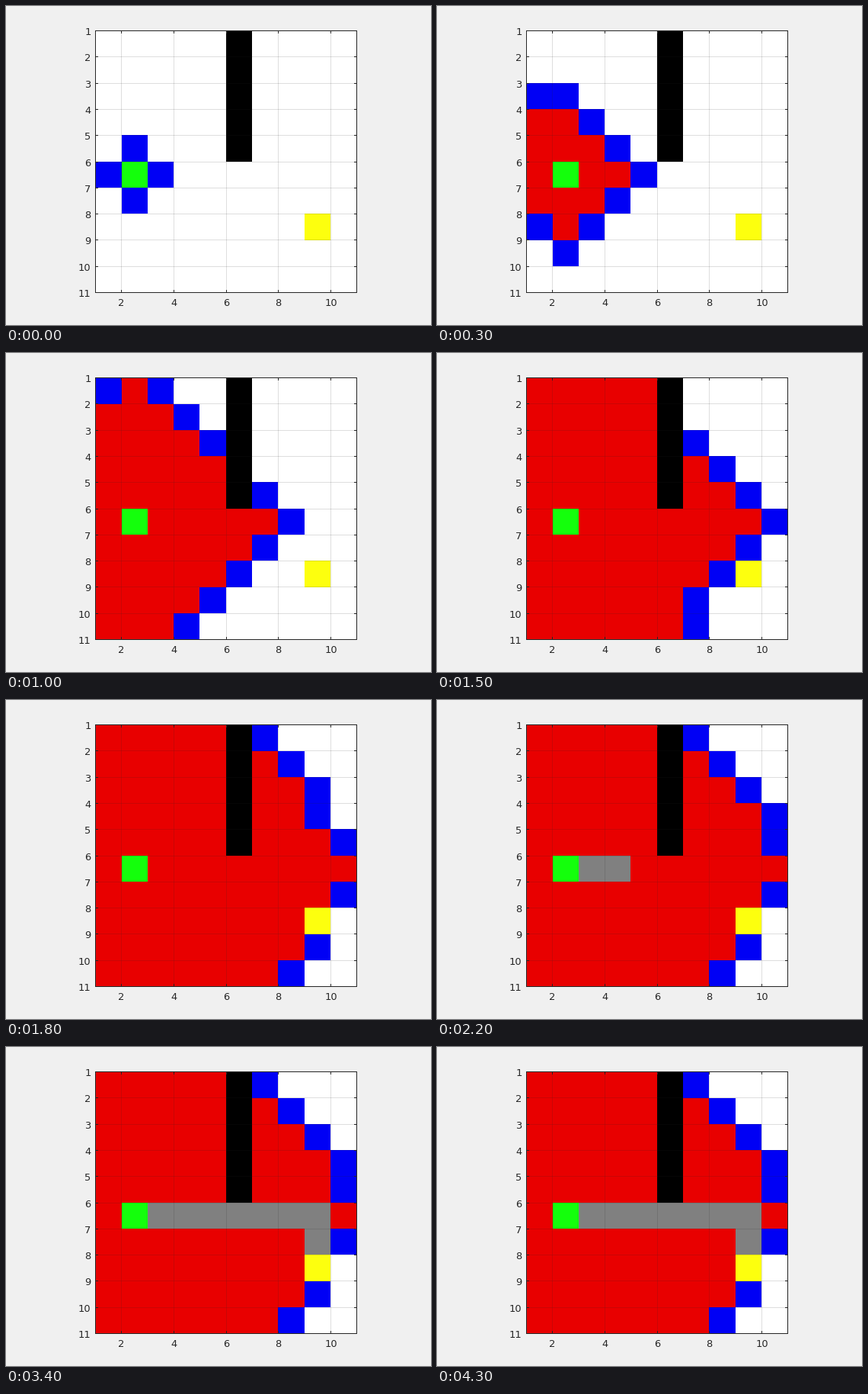
A matplotlib script for the animation above (4.4 s loop, 558 by 418 pixels).

```python
import numpy as np
import matplotlib.pyplot as plt
from matplotlib.animation import FuncAnimation
from matplotlib.colors import to_rgb

W, H, DPI = 558, 418, 64
LEFT, TOP, SIZE = 117, 32, 343     # plot box in whole pixels
RIGHT, BOTTOM = LEFT + SIZE, TOP + SIZE
N = 10
CELL = SIZE / N
TICK = 4
FRAMES, STEP = 44, 100

FREE, WALL, DONE, EDGE, START, GOAL, PATH = range(7)
COLORS = np.array([to_rgb(c) for c in (
    '#ffffff', '#000000', '#e80000', '#0000f5',
    '#14ff0c', '#fdff0e', '#808080')])
INK = np.array(to_rgb('#262626'))
BACK = to_rgb('#f0f0f0')

start, goal = (6, 2), (8, 9)       # (row, column)
walls = {(r, 6) for r in range(1, 6)}


def neighbours(cell):
    r, c = cell
    for p in ((r - 1, c), (r + 1, c), (r, c - 1), (r, c + 1)):
        if 1 <= p[0] <= N and 1 <= p[1] <= N and p not in walls:
            yield p


def search():
    """Cells in the order they are visited, ties resolved column by column."""
    dist, seen = {start: 0}, []
    while True:
        cell = min((p for p in dist if p not in seen),
                   key=lambda p: (dist[p], p[1], p[0]))
        if cell == goal:
            return seen
        seen.append(cell)
        for p in neighbours(cell):
            dist.setdefault(p, dist[cell] + 1)


visited = search()
route = [(6, c) for c in range(3, 10)] + [(7, 9)]


def grid_at(i):
    count = int(np.interp(i, [0, 3, 10, 15, 18, 19],
                          [1, 13, 43, 64, 75, 76]) + 1e-6)
    steps = int(np.clip((i * STEP - 1850) // 140, 0, len(route)))
    g = np.full((N + 1, N + 1), FREE)
    for p in walls:
        g[p] = WALL
    for cell in visited[:count]:
        for p in neighbours(cell):
            g[p] = EDGE
    for p in visited[:count]:
        g[p] = DONE
    for p in route[:steps]:
        g[p] = PATH
    g[start], g[goal] = START, GOAL
    return g[1:, 1:]


def line_px(origin, v):
    """Pixel row or column of the grid line at value v."""
    return int(origin + 0.5 + (v - 1) * CELL)


def cell_index(shift):
    """Cell number under each pixel of the plot box."""
    pos = (np.arange(SIZE) + 0.5 - shift) / CELL
    return np.clip(pos, 0, N - 1).astype(int)


cols, rows = cell_index(0.3), cell_index(0.3)


def ink(area, alpha=1):
    area[:] = area * (1 - alpha) + INK * alpha


def paint(i):
    img = np.empty((H, W, 3))
    img[:] = BACK
    img[TOP:BOTTOM, LEFT:RIGHT] = COLORS[grid_at(i)[np.ix_(rows, cols)]]
    for v in range(2, 11, 2):
        x = line_px(LEFT, v)
        ink(img[TOP:BOTTOM, x], 0.15)
        ink(img[TOP:TOP + TICK, x])
        ink(img[BOTTOM - TICK + 1:BOTTOM, x])
    for v in range(2, 11):
        y = line_px(TOP, v)
        ink(img[y, LEFT:RIGHT], 0.15)
        ink(img[y, LEFT:LEFT + TICK])
        ink(img[y, RIGHT - TICK + 1:RIGHT])
    for y in (TOP, BOTTOM):
        ink(img[y, LEFT:RIGHT + 1])
    for x in (LEFT, RIGHT):
        ink(img[TOP:BOTTOM + 1, x])
    return img


fig = plt.figure(figsize=(W / DPI, H / DPI), dpi=DPI, facecolor=BACK)
stage = fig.figimage(paint(0), origin='upper')


def label(x, y, v, ha):
    fig.text(x / W, 1 - y / H, str(v), ha=ha, va='center_baseline',
             color=INK, family='DejaVu Sans', fontsize=13 * 72 / DPI)


for v in range(2, 11, 2):
    label(line_px(LEFT, v) + 0.5, 388, v, 'center')
for v in range(1, 12):
    label(111.5, line_px(TOP, v) + 0.8, v, 'right')


def update(i):
    stage.set_data(paint(i))
    return [stage]


anim = FuncAnimation(fig, update, frames=FRAMES, interval=STEP,
                     repeat=True, repeat_delay=0, blit=False)
plt.show()
```
